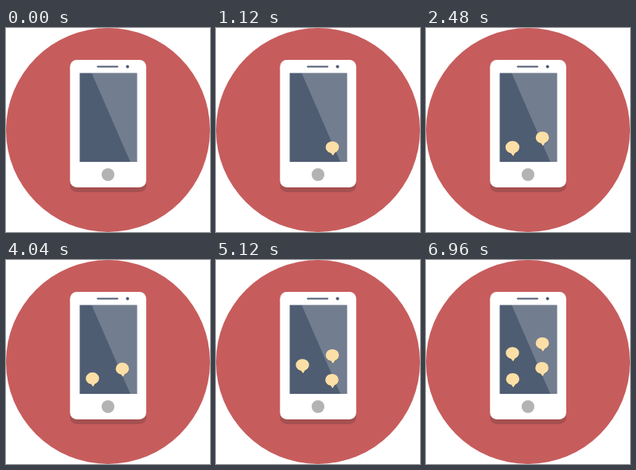
Write an HTML page that moves like this. It is 256x256 px and loops after 7.04 s.

```html
<!DOCTYPE html>
<html lang="en">
<head>
<meta charset="utf-8">
<title>Phone messages</title>
<style>
  html, body { margin: 0; width: 100%; height: 100%; overflow: hidden; background: #fff; }
  svg { display: block; width: 100vw; height: 100vh; }
</style>
</head>
<body>
<svg viewBox="0 0 256 256">
  <defs>
    <clipPath id="screen"><rect x="92.5" y="56.5" width="72" height="111.5"/></clipPath>
    <path id="shape" d="M-8.3 -1.4A8.3 7.4 0 0 1 8.3 -1.4C8.3 2 5.8 4.8 3.2 5.5L.8 9.2L-1.8 5.9C-5.6 5.3 -8.3 2.4 -8.3 -1.4Z"/>
    <g id="bubble">
      <use href="#shape" y="1" fill="#231f20" opacity=".2"/>
      <use href="#shape" fill="#fcdfa6"/>
    </g>
  </defs>
  <circle cx="128" cy="128" r="128" fill="#c75c5c"/>
  <rect x="80.3" y="46" width="95.7" height="160" rx="8.5" fill="#231f20" opacity=".2"/>
  <rect x="80.3" y="40" width="95.7" height="160" rx="8.5" fill="#fff"/>
  <rect x="92.5" y="56.5" width="72" height="111.5" fill="#4f5d73"/>
  <path d="M107.5 56.5H164.5V168H156Z" fill="#fff" opacity=".2"/>
  <path d="M115 48.5H140" stroke="#4f5d73" stroke-width="2" stroke-linecap="round"/>
  <circle cx="152.5" cy="48.5" r="2" fill="#4f5d73"/>
  <circle cx="128" cy="184" r="8" fill="#b3b3b3"/>
  <g id="chat" clip-path="url(#screen)"></g>
</svg>
<script>
const LOOP = 7040, FIRST = 35, GAP = 2000, POP = 1000, SCROLL = 720;

// Each message pops in at (x, y) and scrolls the list up by `push`.
const messages = [
  { x: 146, y: 151, push: 0 },
  { x: 108.5, y: 150.3, push: 13 },
  { x: 145.5, y: 151.7, push: 17.3 },
  { x: 108.8, y: 150.7, push: 15 }
];

const chat = document.getElementById('chat');
for (const m of messages) {
  m.node = document.createElementNS('http://www.w3.org/2000/svg', 'use');
  m.node.setAttribute('href', '#bubble');
  chat.append(m.node);
}

const clamp = v => Math.min(1, Math.max(0, v));
const easeOut = p => 1 - (1 - p) ** 3;
const elastic = p => p <= 0 ? 0 : p >= 1 ? 1
  : 1 + 2 ** (-10 * p) * Math.sin((10 * p - 0.75) * 2 * Math.PI / 3);

function draw(now) {
  const t = now % LOOP;
  const age = i => t - FIRST - i * GAP;
  let below = 0; // remaining scroll of this message and all later ones
  const scrolled = messages.map((m, i) => m.push * easeOut(clamp(age(i) / SCROLL)));
  for (let i = messages.length - 1; i >= 0; i--) {
    const m = messages[i];
    const y = m.y + m.push - scrolled[i] - below;
    const scale = elastic(clamp(age(i) / POP));
    m.node.setAttribute('transform', `translate(${m.x} ${y}) scale(${scale})`);
    m.node.setAttribute('visibility', scale > 0 ? 'visible' : 'hidden');
    below += scrolled[i];
  }
}

const start = performance.now();
function tick() {
  draw(performance.now() - start);
  requestAnimationFrame(tick);
}
tick();
</script>
</body>
</html>
```
